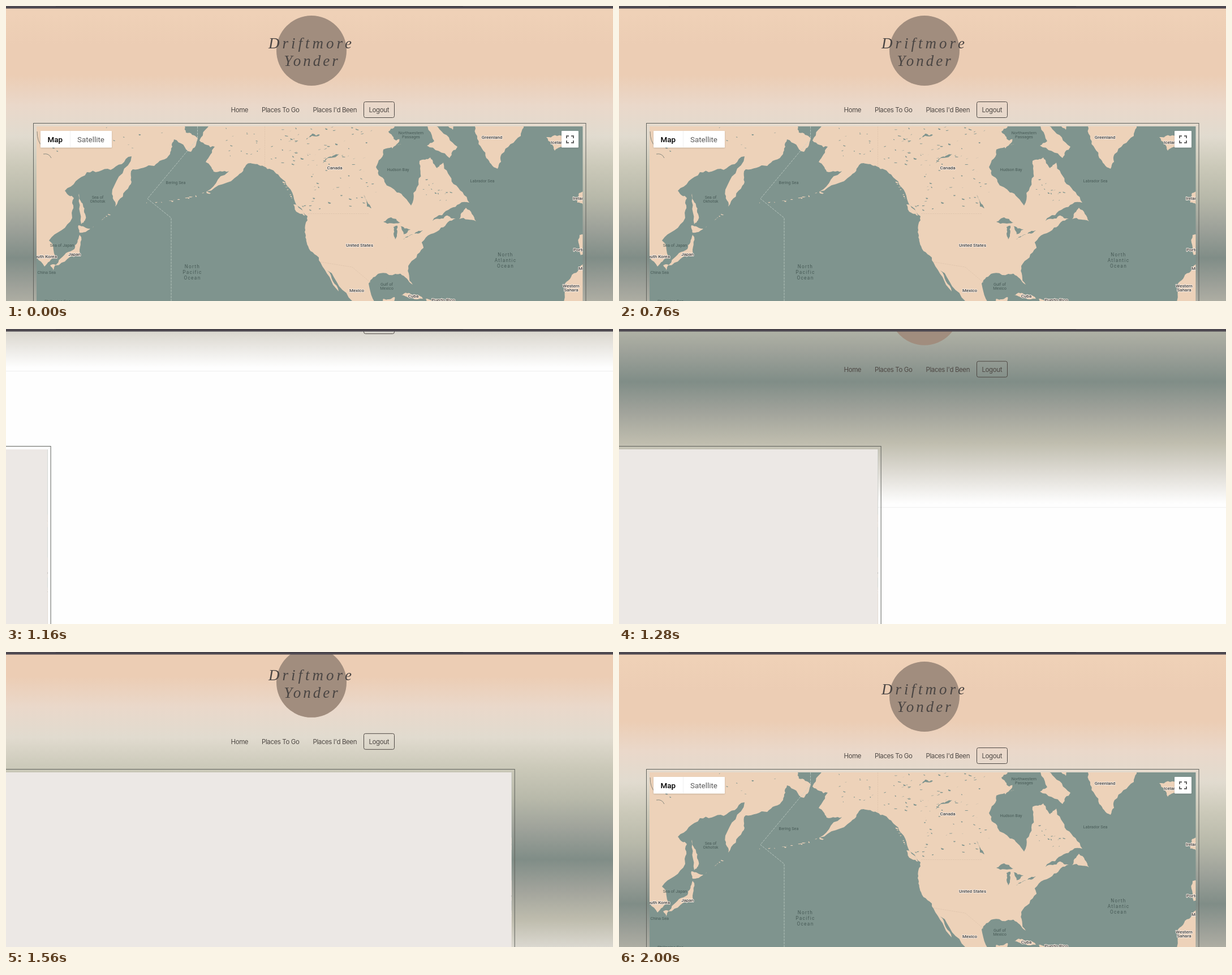
An HTML page that plays this animation: 1073 px wide and 522 px high, repeating every 2040 ms.

```html
<!DOCTYPE html>
<html lang="en">
<head>
<meta charset="utf-8">
<title>Travel map</title>
<style>
html, body { margin: 0; width: 100%; height: 100%; overflow: hidden; background: #fefefe; }
svg { display: block; width: 1073px; height: 522px; }
.nav { font: 400 11.5px Inter, sans-serif; letter-spacing: -.4px; fill: #4e4844; }
.brand { font: italic 27px "Liberation Serif", serif; fill: #4a4543; text-anchor: middle; }
.country { font: 500 8px Roboto, sans-serif; fill: #404040; stroke: #f6ebe1; stroke-width: 2px; stroke-linejoin: round; paint-order: stroke; }
.sea { font: 400 7.3px Roboto, sans-serif; fill: #485b57; }
.ocean { font: 400 8.3px Roboto, sans-serif; fill: #485b57; letter-spacing: 1.3px; }
.control { font: 400 13.4px Roboto, sans-serif; fill: #5a5a5a; }
</style>
</head>
<body>
<svg viewBox="0 0 1073 522">
  <defs>
    <linearGradient id="sky" gradientUnits="userSpaceOnUse" x1="0" y1="14" x2="0" y2="662"></linearGradient>
    <clipPath id="mapClip"><rect x="54" y="213" width="965.5" height="330"/></clipPath>
    <filter id="shadow" x="-10%" y="-20%" width="120%" height="150%">
      <feDropShadow dx="0" dy="1" stdDeviation="1" flood-opacity=".2"/>
    </filter>
  </defs>

  <g id="backdrop">
    <rect width="1073" height="662" fill="url(#sky)"/>
    <rect y="668" width="1073" height="1" fill="#eee"/>
  </g>

  <g id="header">
    <circle cx="540" cy="79" r="62" fill="#a18d7e"/>
    <text class="brand" x="540" y="75" letter-spacing="5">Driftmore</text>
    <text class="brand" x="541" y="106" letter-spacing="4">Yonder</text>
    <g class="nav">
      <text x="397.5" y="188">Home</text>
      <text x="452" y="188">Places To Go</text>
      <text x="542.5" y="188">Places I'd Been</text>
      <text x="641.5" y="188">Logout</text>
    </g>
    <rect x="632.5" y="169.5" width="54" height="28" rx="3" fill="none" stroke="#4e4844"/>
  </g>

  <g id="map">
    <rect x="48.5" y="207.5" width="976.5" height="340" fill="none" stroke="#5f615c"/>
    <g clip-path="url(#mapClip)">
      <rect x="54" y="213" width="966" height="330" fill="#7f948e"/>
      <g id="terrain"></g>
      <path d="M457.5 213V284M534 367.5H642M556 453L612 462 644 489" fill="none" stroke="#dfc4ad" stroke-width=".8" stroke-dasharray="3 1"/>
      <path d="M55 222Q55 240 64 248M66 262Q76 260 80 269" fill="none" stroke="#7c8078" stroke-width=".9"/>
      <path d="M338.5 213V235L250 341 292 375V522" fill="none" stroke="#c5d0c9" stroke-opacity=".75" stroke-dasharray="4 1.5"/>
      <g id="labels"></g>
      <g id="tiles" fill="#ece8e5"></g>
    </g>
    <g id="controls">
      <g fill="#fff" filter="url(#shadow)">
        <rect x="61" y="221" width="126" height="29.5" rx="1"/>
        <rect x="982" y="221" width="30" height="29.5" rx="1"/>
      </g>
      <path d="M113.5 221V250" stroke="#f1f1f1"/>
      <text class="control" x="73.5" y="240.5" style="font-weight:500;fill:#000">Map</text>
      <text class="control" x="126" y="240.5">Satellite</text>
      <path d="M991 234V230H995M999 230H1003V234M1003 238V242H999M995 242H991V238" fill="none" stroke="#666" stroke-width="2"/>
    </g>
  </g>

  <rect width="1073" height="4.5" fill="#4d4850"/>
  <rect x="88" width="720" height="1" fill="#3f3b42"/>
</svg>

<script>
const LOOP = 2040;
const LAND = '#edd2b9', WATER = '#7f948e';
const $ = id => document.getElementById(id);

function add(parent, tag, attrs, text = '') {
  const node = document.createElementNS('http://www.w3.org/2000/svg', tag);
  for (const key in attrs) node.setAttribute(key, attrs[key]);
  node.textContent = text;
  return parent.appendChild(node);
}

let seed = 11;
const random = () => (seed = (seed * 16807) % 2147483647) / 2147483647;
const spread = size => (random() - .5) * size;

// Evenly spaced colours from peach through teal to white.
'efd1b7 eccdb4 eccdb4 ead8ca e1dbcf cbc9b9 b8b9aa 9ea29a 808d87 a1a39b bfbdae dfdcd5 fefefe'
  .split(' ').forEach((color, i, all) =>
    add($('sky'), 'stop', { offset: i / (all.length - 1), 'stop-color': '#' + color }));

// Fills a few key points as a jagged coast, by midpoint displacement.
function coast(fill, outline) {
  let points = outline.split(' ').map(pair => pair.split(',').map(Number));
  for (let pass = 0; pass < 3; pass++) {
    points = points.flatMap((a, i) => {
      const b = points[(i + 1) % points.length];
      const dx = b[0] - a[0], dy = b[1] - a[1];
      const push = spread(2) * Math.min(.17, 3 / (Math.hypot(dx, dy) + .01));
      return [a, [(a[0] + b[0]) / 2 - dy * push, (a[1] + b[1]) / 2 + dx * push]];
    });
  }
  const d = 'M' + points.map(p => p.map(v => v.toFixed(1)).join()).join('L') + 'Z';
  add($('terrain'), 'path', { d, fill });
}

function speck(x, y, size) {
  const w = (.3 + random()) * size, h = spread(size);
  return `M${x},${y}l${w},${h}l${-w * .3},${.6 + random()}l${-w * .6},${-h * .4}Z`;
}

function ponds(x, y, width, height, count, size) {
  let d = '';
  while (count--) d += speck(x + random() * width, y + random() * height, size);
  add($('terrain'), 'path', { d, fill: WATER });
}

function islandChain(x0, y0, x1, y1, count, sag = 0) {
  let d = '';
  for (let i = 0; i < count; i++) {
    const s = random();
    d += speck(x0 + (x1 - x0) * s, y0 + (y1 - y0) * s + sag * s * (1 - s), 5 * (1 - s) + 2);
  }
  add($('terrain'), 'path', { d, fill: LAND });
}

// Eastern Asia, western and eastern North America, Greenland, Africa.
coast(LAND, '40,200 313,200 318,224 339,234 327,258 297,236 290,262 262,283 224,289 218,318 193,355 188,325 222,266 185,290 143,294 104,327 120,340 117,375 76,415 88,445 68,461 40,430');
coast(LAND, '363,200 342,238 369,249 353,276 367,293 397,289 355,328 410,300 432,278 456,284 481,298 508,336 533,372 528,400 534,425 556,454 588,505 568,468 612,522 612,545 652,545 641,491 661,473 705,476 712,350 669,311 654,285 667,254 695,240 694,200');
coast(LAND, '690,330 716,353 729,310 731,274 750,268 762,287 773,277 791,315 819,348 786,358 754,380 778,371 795,376 769,392 735,418 738,428 711,460 719,493 697,473 672,470 672,380');
coast(LAND, '822,200 918,200 910,230 876,262 869,288 849,269 833,235');
coast(LAND, '1030,450 1011,469 988,491 984,540 1030,540');

// Iceland, Ireland, Iberia.
coast(LAND, '955,232 986,229 991,244 970,256');
coast(LAND, '1013,331 1030,326 1030,352 1010,348');
coast(LAND, '1014,405 1030,403 1030,441 1016,441');

// Sakhalin and Japan.
coast(LAND, '129,332 136,352 140,378 133,386');
coast(LAND, '128,388 149,394 130,401');
coast(LAND, '130,405 131,440 87,459 94,449 121,430');
coast(LAND, '78,459 88,458 84,469');

// Newfoundland, Baffin, the smaller Arctic islands, Vancouver, Caribbean, Yucatan.
coast(LAND, '801,377 813,357 831,381');
coast(LAND, '735,200 766,218 798,249 784,269 744,247 757,239');
coast(LAND, '675,240 699,244 683,252');
coast(LAND, '771,200 796,200 790,219');
coast(LAND, '508,351 529,371 517,366');
coast(LAND, '699,511 713,508 737,518');
coast(LAND, '742,518 764,526 743,526');
coast(LAND, '667,518 687,515 683,530 666,530');
islandChain(355, 328, 248, 348, 18, 18);
islandChain(188, 359, 151, 393, 6, 8);
islandChain(479, 293, 505, 340, 10);

// Great Lakes, then Winnipeg, Great Slave, Great Bear and the northern passages.
coast(WATER, '667,382 681,374 697,383');
coast(WATER, '685,391 692,389 688,413');
coast(WATER, '696,388 715,395 703,404');
coast(WATER, '702,413 722,403 737,397 713,407');
coast(WATER, '632,334 646,358 638,355');
coast(WATER, '560,278 571,267 589,262');
coast(WATER, '529,237 541,226 555,228');
coast(WATER, '693,205 715,232 690,238 676,222');
ponds(380, 214, 75, 55, 16, 3.5);
ponds(468, 214, 182, 70, 60, 5);
ponds(520, 285, 130, 75, 35, 4.5);
ponds(735, 305, 50, 40, 16, 4);
ponds(60, 214, 220, 42, 14, 4);

function label(kind, x, y, lines, anchor = 'middle', step = 7) {
  lines.split('|').forEach((line, i) =>
    add($('labels'), 'text', { class: kind, x, y: y + i * step, 'text-anchor': anchor }, line));
}
label('country', 581, 288.5, 'Canada');
label('country', 625, 425.5, 'United States');
label('country', 620, 505.5, 'Mexico');
label('country', 859, 234.5, 'Greenland');
label('country', 121, 441.5, 'Japan');
label('country', 90, 446, 'South Korea', 'end');
label('country', 963, 243.5, 'Iceland', 'start');
label('country', 1002, 343, 'Ireland', 'start');
label('country', 1003, 434, 'Portugal', 'start');
label('country', 1012, 467, 'Morocco', 'start');
label('country', 720, 515.5, 'Cuba');
label('country', 773, 523, 'Puerto Rico');
label('country', 999, 498, 'Western|Sahara');
label('sea', 300, 315, 'Bering Sea');
label('sea', 162, 341, 'Sea of|Okhotsk');
label('sea', 99, 425.5, 'Sea of Japan');
label('sea', 88, 474, 'East China Sea', 'end');
label('sea', 91, 525, 'Philippine Sea');
label('sea', 693, 292, 'Hudson Bay');
label('sea', 842, 311.5, 'Labrador Sea');
label('sea', 716, 226.5, 'Northwestern|Passages');
label('sea', 673, 495, 'Gulf of|Mexico');
label('ocean', 329.5, 464, 'North|Pacific|Ocean', 'middle', 9.8);
label('ocean', 883, 443, 'North|Atlantic|Ocean', 'middle', 9.8);

// Tiles fade in from the middle columns outwards, the top row last.
const TILE = 191, FADE = 160;
const tiles = [];
for (let row = 0; row < 3; row++) {
  for (let column = 0; column < 6; column++) {
    const delay = 16 * (column - 2.6) ** 2 + (row ? 0 : 72);
    const cover = add($('tiles'), 'rect', {
      x: 102 + (column - 1) * TILE, y: 225 + (row - 1) * TILE,
      width: TILE, height: TILE, 'shape-rendering': 'crispEdges'
    });
    tiles.push({ start: 1571 + delay, cover });
  }
}

// Share of the slide still to go, decaying exponentially between key times.
const slide = [[1160, .95], [1280, .565], [1400, .289], [1680, .068]];
function remaining(t) {
  if (t < 960) return 0;
  if (t < 1160) return 1.025;
  if (t >= 1680) return .068 * Math.max(0, (2000 - t) / 320) ** 2;
  const i = slide.findIndex(([time]) => t < time);
  const [t0, a] = slide[i - 1], [t1, b] = slide[i];
  return a * (b / a) ** ((t - t0) / (t1 - t0));
}

function draw(t) {
  const p = remaining(t);
  $('backdrop').setAttribute('transform', `translate(0 ${-628 * p})`);
  $('header').setAttribute('transform', `translate(0 ${-200 * p})`);
  $('map').setAttribute('transform', `translate(${-1000 * p} 0)`);
  for (const { start, cover } of tiles) {
    const shown = t < 960 ? 1 : Math.min(1, Math.max(0, (t - start) / FADE));
    cover.setAttribute('opacity', 1 - shown);
  }
  $('controls').setAttribute('visibility', t < 960 || t >= 1800 ? 'visible' : 'hidden');
}

const begin = performance.now();
function tick(now) {
  draw(Math.max(0, now - begin) % LOOP);
  requestAnimationFrame(tick);
}
draw(0);
requestAnimationFrame(tick);
</script>
</body>
</html>
```
